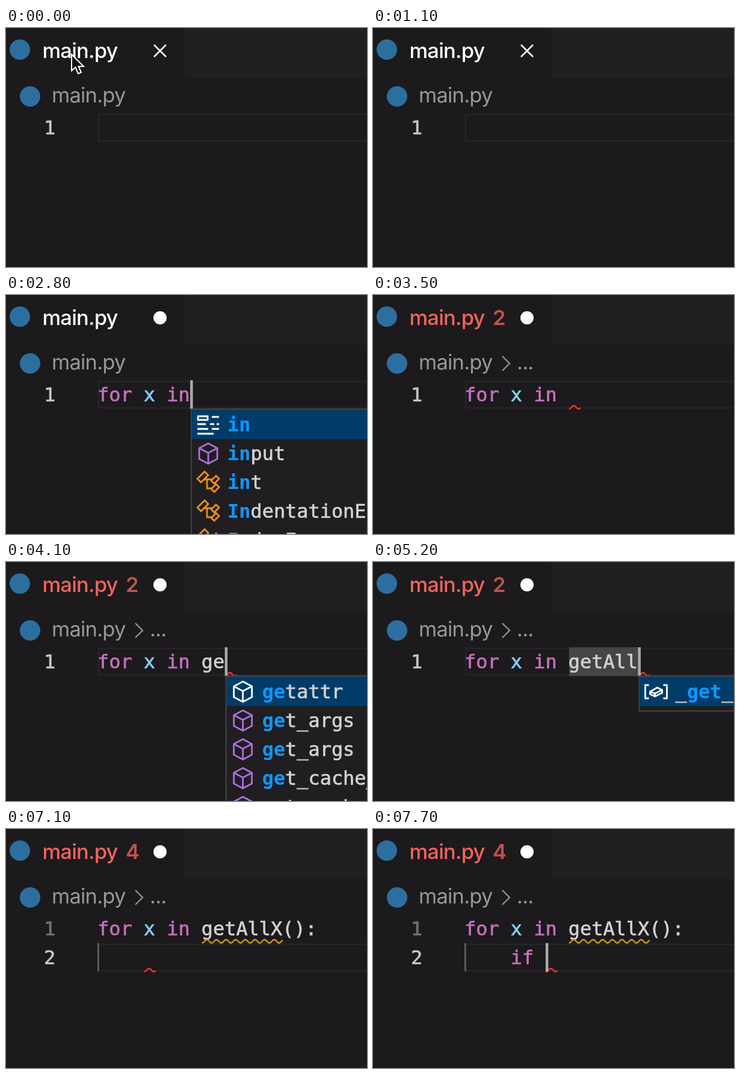
An HTML page with a canvas that plays this animation: 600x398 px, repeating every 8000 ms.

```html
<!DOCTYPE html>
<html>
<head>
<meta charset="utf-8">
<title>Typing in an editor</title>
<style>
html, body { margin: 0; width: 100%; height: 100%; overflow: hidden; background: #1c1a1c; }
canvas { display: block; }
</style>
</head>
<body>
<canvas id="stage" width="600" height="398"></canvas>
<script>
const c = document.getElementById('stage').getContext('2d');
const LOOP = 8000, LEFT = 153, TOP = 142, LINE = 48, CHAR = 19.2;
const MONO = '31.9px "DejaVu Sans Mono", monospace';
const UI = '34.5px Inter, sans-serif';
const PURPLE = '#c56fbe', BLUE = '#0c98ff', RED = '#f0302f', YELLOW = '#c99a0e';

// [start time, text before the caret, text after the caret]
const typing = [
  [0, ''], [1600, 'f'], [1800, 'fo'], [1900, 'for'], [2100, 'for '], [2300, 'for x'],
  [2500, 'for x '], [2600, 'for x i'], [2800, 'for x in'], [3100, 'for x in '],
  [3800, 'for x in g'], [4000, 'for x in ge'], [4300, 'for x in get'],
  [4600, 'for x in getA'], [4800, 'for x in getAl'], [5000, 'for x in getAll'],
  [5400, 'for x in getAllX'], [5600, 'for x in getAllX(', ')'],
  [6200, 'for x in getAllX()'], [6400, 'for x in getAllX():'],
  [6600, 'for x in getAllX():\n    '], [7400, 'for x in getAllX():\n    i'],
  [7600, 'for x in getAllX():\n    if'], [7700, 'for x in getAllX():\n    if ']
];

// [start, end, rows]; a row is its icon letter and label, matched letters in brackets
const popups = [
  [1700, 1800, 's[f]or|c[f]ilter|k[f]loat|c[f]ormat|k[f]rozenset'],
  [1800, 1900, 's[fo]r|c[fo]rmat|k[Fo]rwardRef|v[F]ileDescript[o]r|v[F]ileDescript[o]rLike'],
  [1900, 2100, 's[for]|c[for]mat|k[For]wardRef|v[F]ileDescript[or]|v[F]ileDescript[or]Like'],
  [2700, 2800, 's[i]n|c[i]nput|k[i]nt|k[I]ndentationError|k[I]ndexError'],
  [2800, 3100, 's[in]|c[in]put|k[in]t|k[In]dentationError|k[In]dexError'],
  [3900, 4000, 'c[g]etattr|c[g]et_args|c[g]et_args|c[g]et_cache_token|c[g]et_cached_id'],
  [4000, 4300, 'c[ge]tattr|c[ge]t_args|c[ge]t_args|c[ge]t_cache_token|c[ge]t_cached_id'],
  [4300, 4600, 'c[get]attr|c[get]_args|c[get]_args|c[get]_cache_token|c[get]_cached_id'],
  [4600, 5400, 'v_[get]_tail_layout'],
  [7500, 7600, 's[i]f|s[i]f/else|s[i]mport|k[i]nt'],
  [7600, 7700, 's[if]|s[if]/else|k[i]ntEnumFlag|c[i]sfile']
];

function rect(x, y, w, h, color) {
  c.fillStyle = color;
  c.fillRect(x, y, w, h);
}

function frame(x, y, w, h, color, width = 2) {
  c.strokeStyle = color;
  c.lineWidth = width;
  c.strokeRect(x, y, w, h);
}

function label(s, x, y, color, weight = '400') {
  c.font = weight + ' ' + UI;
  c.letterSpacing = '-0.8px';
  c.fillStyle = color;
  c.fillText(s, x, y);
}

// Code text, slightly thickened unless it is bold
function code(s, x, y, color, bold) {
  c.font = (bold ? 'bold ' : '') + MONO;
  c.letterSpacing = '0px';
  c.fillStyle = c.strokeStyle = color;
  c.lineWidth = 0.7;
  c.fillText(s, x, y);
  if (!bold) c.strokeText(s, x, y);
}

function circle(x, y, r, color) {
  c.fillStyle = color;
  c.beginPath();
  c.arc(x, y, r, 0, 7);
  c.fill();
}

function path(d, color, width, fill) {
  const p = new Path2D(d);
  if (fill) { c.fillStyle = fill; c.fill(p); }
  c.strokeStyle = color;
  c.lineWidth = width;
  c.stroke(p);
}

const colX = col => LEFT + col * CHAR;

function squiggle(col, count, line, color) {
  const x0 = colX(col), y = TOP + LINE * line + 45;
  c.beginPath();
  for (let x = 0; x <= count * CHAR; x++) c.lineTo(x0 + x, y + 2.7 * Math.cos(x * Math.PI / 8));
  c.strokeStyle = color;
  c.lineWidth = 2.4;
  c.stroke();
}

function icon(kind, x, y, selected) {
  const color = selected ? '#fff' : { c: '#b06fe0', k: '#ee8f12', v: '#4fb0f0', s: '#d4d4d4' }[kind];
  const shapes = {
    s: 'M-17-14H-1V-8H-17ZM6-13H18M-18-1H-4M3-1H10M14-1H18M-18 7H0M6 7H18M-18 15H9',
    c: 'M0-17L15-9V9L0 17L-15 9V-9ZM-15-9L0-1L15-9M0-1V17',
    k: 'M-18-6L-6-18L0-12L-12 0ZM-7-5H6M-2-5V10H6M5-3L13-11L18-6L10 2ZM5 11L13 3L18 8L10 16Z',
    v: 'M-12-11H-18V11H-12M12-11H18V11H12M-10 0L2-7L10-3V2L-2 8L-10 4ZM-10 0L-2 3L10-3M-2 3V8'
  };
  c.save();
  c.translate(x, y);
  path(shapes[kind], color, 2.8);
  c.restore();
}

function popup(rows, x, y) {
  const height = rows.length * LINE + 10;
  rect(x, y, 600, height, '#201e20');
  frame(x, y, 700, height, '#454346');
  rect(x + 1, y + 1, 600, LINE + 1, '#003c6a');
  rows.forEach((row, i) => {
    const mid = y + 25 + i * LINE;
    let tx = x + 60;
    icon(row[0], x + 28, mid + 1, i === 0);
    row.slice(1).split(/[\[\]]/).forEach((part, n) => {
      const match = n % 2;
      code(part, tx, mid + 11.5, match ? BLUE : '#d2d2d2', match);
      tx += part.length * CHAR;
    });
  });
}

function codeLine(s, line) {
  for (const m of s.matchAll(/\w+|[^\w\s]/g)) {
    const color = /^(for|in|if)$/.test(m[0]) ? PURPLE : m[0] === 'x' ? '#7fd3fb' : '#d2d2d2';
    code(m[0], colX(m.index) - 1, TOP + 34.5 + line * LINE, color);
  }
}

function header(t) {
  const bad = t >= 3300, title = bad ? '#f2645c' : '#fff';
  rect(297, 0, 303, 83, '#211f21');
  circle(23, 36, 17, '#2c6f9f');
  circle(40, 114, 17, '#2c6f9f');
  label('main.py', 60.5, 49.5, title, '500');
  label('main.py', 76, 124, '#989798');
  if (t < 1600) path('M246 28L266 48M266 28L246 48', '#fff', 2.6);
  else circle(256, 38, 11, '#fff');
  if (bad) {
    label(t < 6900 ? '2' : '4', 199, 49.5, '#bd534e', '600');
    path('M215 102L227 114L215 126', '#989798', 2.2);
    label('...', 239, 124, '#989798');
  }
}

function pointer(t) {
  if (t < 300) {
    c.save();
    if (t >= 200) c.translate(62, 58);
    path('M109 44V71L115.500 65.500L120 76L125 74L120.500 64H129Z', '#fff', 2, '#111');
    c.restore();
  } else if (t < 600) {
    path('M235 151Q241 151 241 156V188Q241 193 235 193M247 151Q241 151 241 156M241 188Q241 193 247 193M237 177H245', '#ddd', 2);
  }
}

function marks(t, col) {
  if (t >= 3300 && t < 6900) squiggle(Math.min(col, 15), 1, 0, RED);
  if (t >= 5700) squiggle(9, t < 6900 ? 6 : 7, 0, YELLOW);
  if (t >= 6900 && (t < 7400 || t >= 7700)) squiggle(col, 1, 1, RED);
}

function draw(t) {
  const [, before, after = ''] = typing.findLast(s => s[0] <= t);
  const lines = before.split('\n'), row = lines.length - 1;
  const col = lines[row].length, y = TOP + row * LINE, x = colX(col);

  rect(0, 0, 600, 398, '#1c1a1c');
  header(t);
  frame(154, y + 2, 460, 44, '#272527', 2.5);
  if (row) rect(152, y, 2.5, 47, '#646264');
  if (t >= 5100 && t < 5400) rect(colX(9), TOP, 6 * CHAR, 48, '#454446');
  if (t >= 5600 && t < 6400) {
    for (const n of [16, 17]) {
      rect(colX(n) + 1, TOP + 1, 18, 46, '#1d251e');
      frame(colX(n) + 1, TOP + 1, 18, 46, '#858585', 1.6);
    }
  }
  lines.forEach((s, i) => {
    code(i + 1, 63, TOP + 34.5 + i * LINE, i === row ? '#c8c8c8' : '#747274');
    codeLine(i === row ? s + after : s, i);
  });
  marks(t, col);

  const hidden = t < 500 || t >= 1100 && t < 1600 || t >= 3500 && t < 3800 || t >= 7100 && t < 7400;
  if (!hidden) rect(x - 0.5, y, 4.5, 48, '#aaa9a8');
  const list = popups.find(p => t >= p[0] && t < p[1]);
  if (list) popup(list[2].split('|'), x + 1.5, y + 48);
  pointer(t);
}

function tick() {
  draw(performance.now() % LOOP);
  requestAnimationFrame(tick);
}
tick();
</script>
</body>
</html>
```
